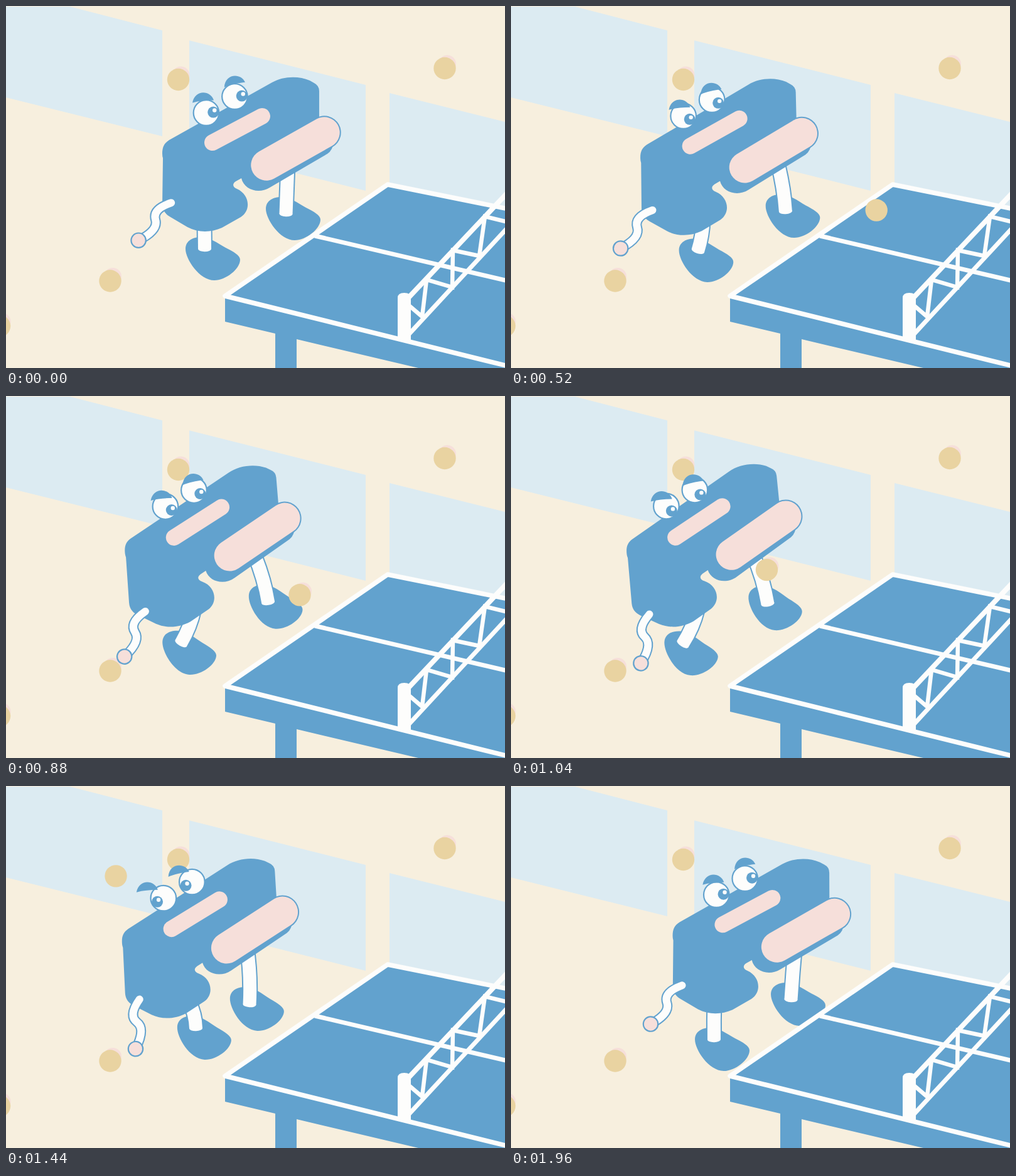
An HTML page for the animation above (2 s loop, 795 px wide and 578 px high).

```html
<!DOCTYPE html>
<html lang="en">
<head>
<meta charset="utf-8">
<title>Table tennis</title>
<style>
  html, body { margin: 0; width: 100%; height: 100%; overflow: hidden; background: #f7efde; }
  svg { display: block; width: 795px; height: 578px; }
  .blue { fill: #62a2ce; }
  .pale { fill: #dcebf2; }
  .white { fill: #fdfdfc; }
  .pink { fill: #f6dfda; }
  .tan { fill: #e9d3a1; }
  .line { fill: none; stroke: #fdfdfc; }
  .edge { stroke: #62a2ce; stroke-width: 2.2; }
  .rim { fill: none; stroke: #62a2ce; }
  .rosy { fill: none; stroke: #f6dfda; }
  .round { stroke-linecap: round; }
</style>
</head>
<body>
<svg viewBox="0 0 795 578">
  <defs>
    <g id="dot">
      <circle class="pink" cx="4" cy="-7" r="14"/>
      <circle class="tan" r="17.7"/>
    </g>
    <path id="foot" class="blue" d="M0-50C0-64 13-69 24-69C38-69 50-60 64-52C76-46 87-40 87-33C87-18 64 0 46 0C22 0 0-34 0-50Z"/>
    <path id="brow" class="blue" d="M-22-16C-18-38 7-36 12-20C0-20-12-19-22-16Z"/>
    <path id="sleeve" d="M0 0Q-30 10-25 27T-52 60"/>
  </defs>

  <rect width="795" height="578" fill="#f7efde"/>
  <path class="pale" d="M0 1H102L249 39V208L0 146ZM292 55L573 126V295L292 224ZM611 139L795 185V340L611 300Z"/>
  <use href="#dot" x="274.5" y="117.5"/>
  <use href="#dot" x="699" y="99.5"/>
  <use href="#dot" x="166" y="439"/>
  <use href="#dot" x="-10.5" y="511"/>

  <g id="back"></g>
  <g id="front"></g>

  <g id="body">
    <path class="blue" d="M249 236C249 225 252 219 260 214L424 122C441 112 466 111 484 119L491 123Q499 127 499 136V190L522 216Q521 230 512 236L420 290C402 301 379 293 375 275L366 280C360 284 361 289 368 292C388 301 391 326 374 337L344 354C326 362 306 362 289 353L262 337Q249 330 249 316L250 243Q249 240 249 236Z"/>
    <path class="rosy round" stroke-width="26" d="M329 218L408 176"/>
    <path class="rim round" stroke-width="53.5" d="M415 254L507 202"/>
    <path class="rosy round" stroke-width="49.5" d="M415 254L507 202"/>
  </g>
  <g id="eyes"></g>
  <g id="arm">
    <use href="#sleeve" class="rim round" stroke-width="16"/>
    <use href="#sleeve" class="line round" stroke-width="12"/>
    <circle class="pink edge" cx="-52" cy="60" r="11.7"/>
  </g>

  <path class="blue" d="M349 463L608 285L795 325V578H657L463 532V578H429V523L349 504Z"/>
  <g class="line">
    <path stroke-width="7.5" stroke-linejoin="round" d="M800 324L608 285L349 463L800 575"/>
    <path stroke-width="7" d="M492 367L800 439"/>
    <path stroke-width="8" d="M641 466L800 297"/>
    <path stroke-width="7" d="M641 525L800 353"/>
    <path stroke-width="6.5" d="M643 479L663 496L670 437L711 449L712 390L754 399L763 336L800 345"/>
  </g>
  <path class="white" d="M624 534V466Q624 458 634.5 458T645 466V534Q634 538 624 534Z"/>

  <g id="ball">
    <circle id="glow" class="pink" cx="5" cy="-6" r="14"/>
    <circle class="tan" r="17.7"/>
  </g>
</svg>
<script>
const LOOP = 2, FRAME = .04;
const $ = id => document.getElementById(id);
const move = (el, x, y, turn = 0) => el.setAttribute('transform', `translate(${x} ${y}) rotate(${turn})`);
const bump = (t, mid, width) => Math.exp(-(((t - mid) / width) ** 2));

// Smooth curve through keys [time, ...values], times in seconds.
function spline(keys, t) {
  const last = keys.length - 1;
  if (t >= keys[last][0]) return keys[last].slice(1);
  const i = keys.findIndex(k => k[0] > t) - 1;
  const b = keys[i], c = keys[i + 1];
  const a = keys[Math.max(i - 1, 0)], d = keys[Math.min(i + 2, last)];
  const h = c[0] - b[0], u = (t - b[0]) / h, w = 1 - u;
  return b.slice(1).map((p, n) => {
    const q = c[n + 1];
    const m = h * (q - a[n + 1]) / (c[0] - a[0]);
    const o = h * (d[n + 1] - p) / (d[0] - b[0]);
    return p * (1 + 2 * u) * w * w + m * u * w * w + q * u * u * (3 - 2 * u) - o * u * u * w;
  });
}

const sway = [[0, 0], [.32, -31], [1.04, -66.5], [1.44, -65], [1.96, 8.5]];
const gaze = [[0, -5], [.32, 24], [1.04, 41], [1.44, 150], [1.72, -5]];

// Each step is time, foot shift x and y, hip shift x.
const legs = [
  { el: $('back'), foot: [414, 374], ankle: [32, -42], hip: [449, 252],
    steps: [[0, 0, 0, 0], [.32, 0, -4, -9], [1.04, -37, 0, -64], [1.44, -58, 17, -66], [1.72, -48, 14, -39], [1.96, 0, 9, 4]] },
  { el: $('front'), foot: [286, 438], ankle: [30.5, -50], hip: [316, 342],
    steps: [[0, 0, 0, 0], [.68, -25, 4, -13], [1.04, -43, 8, -19], [1.44, -14, -1, -25], [1.72, 4, 11, 12], [1.96, 7, 17, 8]] }
];

for (const { el } of legs) {
  el.innerHTML = `<path class="rim" stroke-width="25"/>
    <g><use href="#foot" x="-44" y="34"/></g>
    <path class="line" stroke-width="21"/>
    <ellipse class="white" rx="4.2" ry="10.5"/>`;
}
const eye = (x, y, brow) => `<g transform="translate(${x} ${y})">
  <circle class="white edge" r="20.3"/>
  <g class="pupil"><circle class="blue" r="9"/><circle class="white" cx="2" cy="-3" r="3.2"/></g>
  <g class="lid"><use href="#brow" transform="${brow}"/></g></g>`;
$('eyes').innerHTML = eye(0, 0, '') + eye(45.5, -26, 'translate(7 -1.5) rotate(-7)');
const pupils = document.querySelectorAll('.pupil');
const lids = document.querySelectorAll('.lid');

function drawLeg({ el, foot, ankle, hip, steps }, t, bend, tilt) {
  const [rim, sole, leg, cap] = el.children;
  const [dx, dy, lean] = spline(steps, t);
  const fx = foot[0] + dx, fy = foot[1] + dy;
  const ax = fx + ankle[0], ay = fy + ankle[1];
  const hx = hip[0] + lean, hy = hip[1];
  const kx = (hx + ax) / 2 + bend, ky = (hy + ay) / 2;
  const d = `M${hx} ${hy}Q${kx} ${ky} ${ax} ${ay}`;
  rim.setAttribute('d', d);
  leg.setAttribute('d', d);
  move(sole, fx + 44, fy - 34, tilt);
  move(cap, ax, ay, Math.atan2(ay - ky, ax - kx) * 180 / Math.PI);
}

// Falls onto the table, bounces and speeds off to the left.
function drawBall(t) {
  const enter = .04, bounce = .64, leave = 1.68;
  const shown = t >= enter && t < leave;
  $('ball').style.display = shown ? '' : 'none';
  $('glow').style.display = t > .56 && t < 1.24 ? '' : 'none';
  if (t < bounce) {
    const u = (t - enter) / (bounce - enter);
    move($('ball'), 815 - 291 * u, 271 + 86 * u * u);
  } else {
    const u = (t - bounce) / (leave - bounce);
    const g = .28 * u + .72 * u * u;
    move($('ball'), 524 - 544 * g, 357 - 390 * g + 90 * g * g);
  }
}

function draw(t) {
  const [x] = spline(sway, t);
  const y = (2.5 + 2.7 * t * t) * Math.sin(Math.PI * t * (1.3 + .1 * t));
  const tilt = 5.8 * bump(t, 1.1, .48);
  $('body').setAttribute('transform', `translate(${x} ${y}) rotate(${-tilt} 461 228)`);
  move($('eyes'), 319 + x - .9 * tilt, 170.5 + y + 1.9 * tilt);
  move($('arm'), 263 + x + 4.2 * tilt, 314 + y + 7 * tilt, -44 * bump(t, 1.27, .39));

  // Brows follow the pupils.
  const angle = spline(gaze, t)[0] * Math.PI / 180;
  const px = 11.3 * Math.cos(angle), py = 11.3 * Math.sin(angle);
  pupils.forEach(p => move(p, px, py));
  lids.forEach(l => move(l, px - 11.2, py + 1));

  legs.forEach(leg => drawLeg(leg, t, -.08 * x, .8 * tilt));
  drawBall(t);
}

const start = performance.now();
function tick() {
  const t = Math.max(0, performance.now() - start) / 1000 % LOOP;
  draw(Math.floor(t / FRAME + 1e-6) * FRAME);
  requestAnimationFrame(tick);
}
tick();
</script>
</body>
</html>
```
